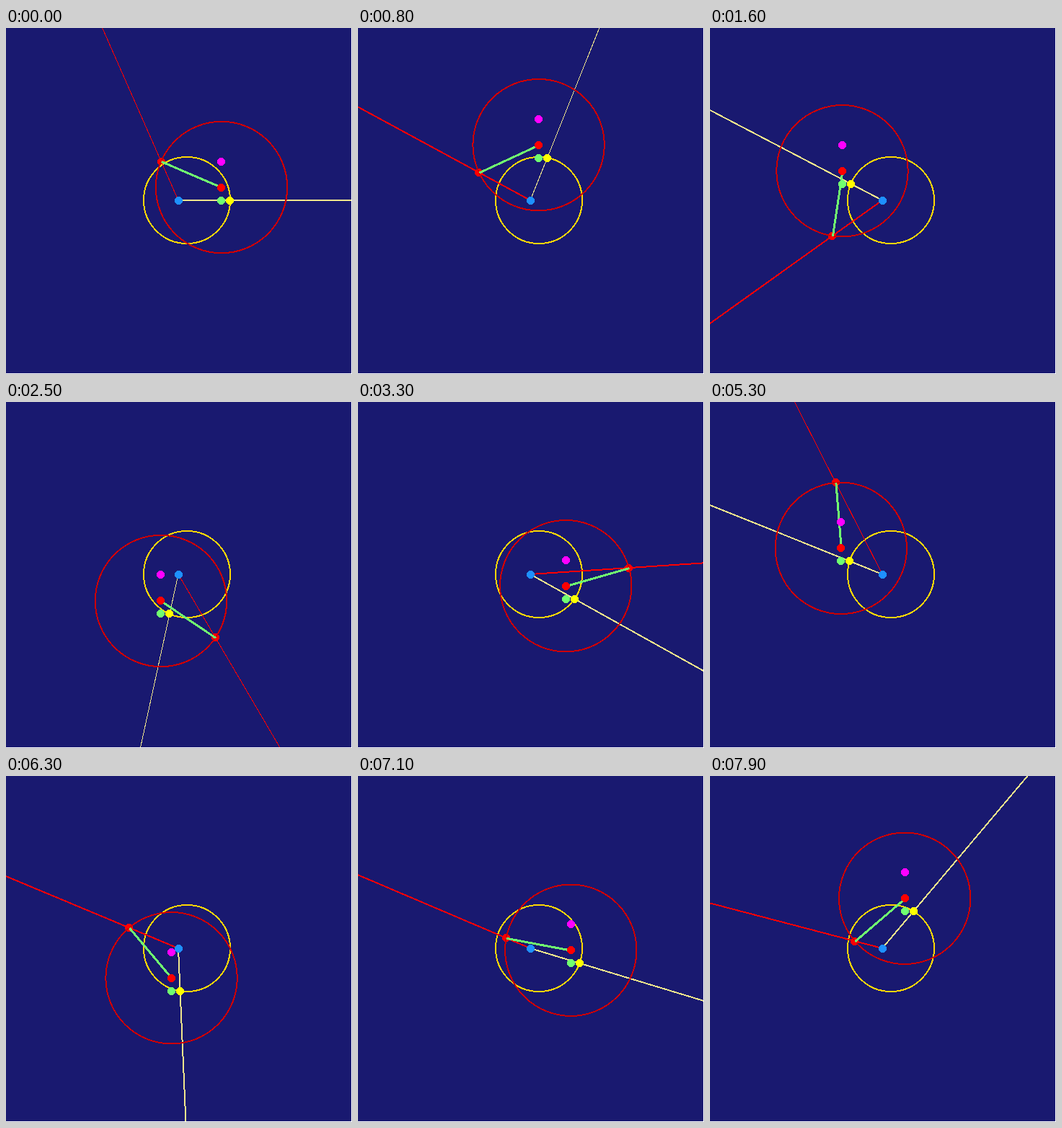
An HTML page that plays this animation: 480 by 480 pixels, repeating every 8 s.

```html
<!DOCTYPE html>
<html lang="en">
<head>
<meta charset="utf-8">
<title>Geocentric model with equant</title>
<style>
  html, body { margin: 0; width: 100%; height: 100%; overflow: hidden; background: #191970; }
  svg { display: block; width: 100vw; height: 100vh; }
</style>
</head>
<body>
<svg id="stage" viewBox="0 0 480 480" shape-rendering="crispEdges"></svg>
<script>
const LOOP = 8000, STEP = 100;
const CENTER = 239, SUN_R = 60, PLANET_R = 91.2;
const SUN_SHIFT = 12, DEFERENT_SHIFT = 18, EQUANT_SHIFT = 54;
// degrees per step: ten days of mean motion
const SUN_RATE = 9.8565, PLANET_RATE = 5.24;
const stage = document.getElementById('stage');

function add(tag, attrs) {
  const el = document.createElementNS('http://www.w3.org/2000/svg', tag);
  set(el, attrs);
  stage.append(el);
  return el;
}
function set(el, attrs) {
  for (const key in attrs) el.setAttribute(key, attrs[key]);
}
const ring = (stroke, r) => add('circle', { r, stroke, fill: 'none', 'stroke-width': 2 });
const line = (stroke, width) => add('line', { stroke, 'stroke-width': width });
const dot = fill => add('circle', { fill, r: 5.5 });

const planet = dot('#ff0000');
const sunOrbit = ring('#ffd700', SUN_R);
const sunRay = line('#f0e68c', 2);
const deferent = ring('#cd0000', PLANET_R);
const planetRay = line('#ff0000', 2);
const arm = line('#70ff70', 3);
const equantDot = dot('#ff00ff');
const deferentDot = dot('#ff0000');
const meanSun = dot('#70ff70');
const sun = dot('#ffff00');
const earth = dot('#1e90ff');
// light edge along the right and bottom of the stage
add('path', { d: 'M479.5 0V479.5H0', fill: 'none', stroke: '#ffffff' });

// dots sit on whole pixels
const placeDot = (el, p) =>
  set(el, { cx: Math.floor(p.x - 0.01) + 0.5, cy: Math.floor(p.y + 0.01) + 0.5 });
const placeRing = (el, p) => set(el, { cx: p.x, cy: p.y });
const placeLine = (el, a, b) => set(el, { x1: a.x, y1: a.y, x2: b.x, y2: b.y });
const offset = (p, x, y) => ({ x: p.x + x, y: p.y + y });
const polar = (p, r, angle) => offset(p, r * Math.cos(angle), -r * Math.sin(angle));
const radians = deg => deg * Math.PI / 180;

function castRay(el, from, through) {
  const dx = through.x - from.x, dy = through.y - from.y;
  const length = Math.hypot(dx, dy), slant = Math.abs(dx) / length;
  placeLine(el, from, offset(from, dx / length * 600, dy / length * 600));
  // steep slanted rays rasterise one pixel wide
  el.setAttribute('stroke-width', slant > 0.2 && slant < 0.61 ? 1 : 2);
}

const home = { x: CENTER, y: CENTER };
placeRing(sunOrbit, offset(home, SUN_SHIFT, 0));
placeDot(earth, offset(home, 0.5, 0.5));

function render(time) {
  const step = Math.floor((time % LOOP) / STEP);
  const mean = polar(home, SUN_R, radians(step * SUN_RATE));
  const sunPos = offset(mean, SUN_SHIFT, 0);
  const middle = offset(mean, 0, -DEFERENT_SHIFT);
  const equant = offset(mean, 0, -EQUANT_SHIFT);

  // uniform turn about the equant, at a fixed distance from the deferent centre
  const angle = radians(180 + step * PLANET_RATE);
  const gap = EQUANT_SHIFT - DEFERENT_SHIFT;
  const reach = Math.sqrt(PLANET_R ** 2 - (gap * Math.cos(angle)) ** 2) - gap * Math.sin(angle);
  const planetPos = polar(equant, reach, angle);

  placeDot(planet, planetPos);
  placeDot(equantDot, equant);
  placeDot(deferentDot, middle);
  placeDot(meanSun, mean);
  placeDot(sun, sunPos);
  placeRing(deferent, middle);
  placeLine(arm, offset(middle, 0.5, 0.5), offset(planetPos, 0.5, 0.5));
  castRay(sunRay, home, sunPos);
  castRay(planetRay, home, planetPos);
}

const start = performance.now();
function tick() {
  render(performance.now() - start);
  requestAnimationFrame(tick);
}
tick();
</script>
</body>
</html>
```
